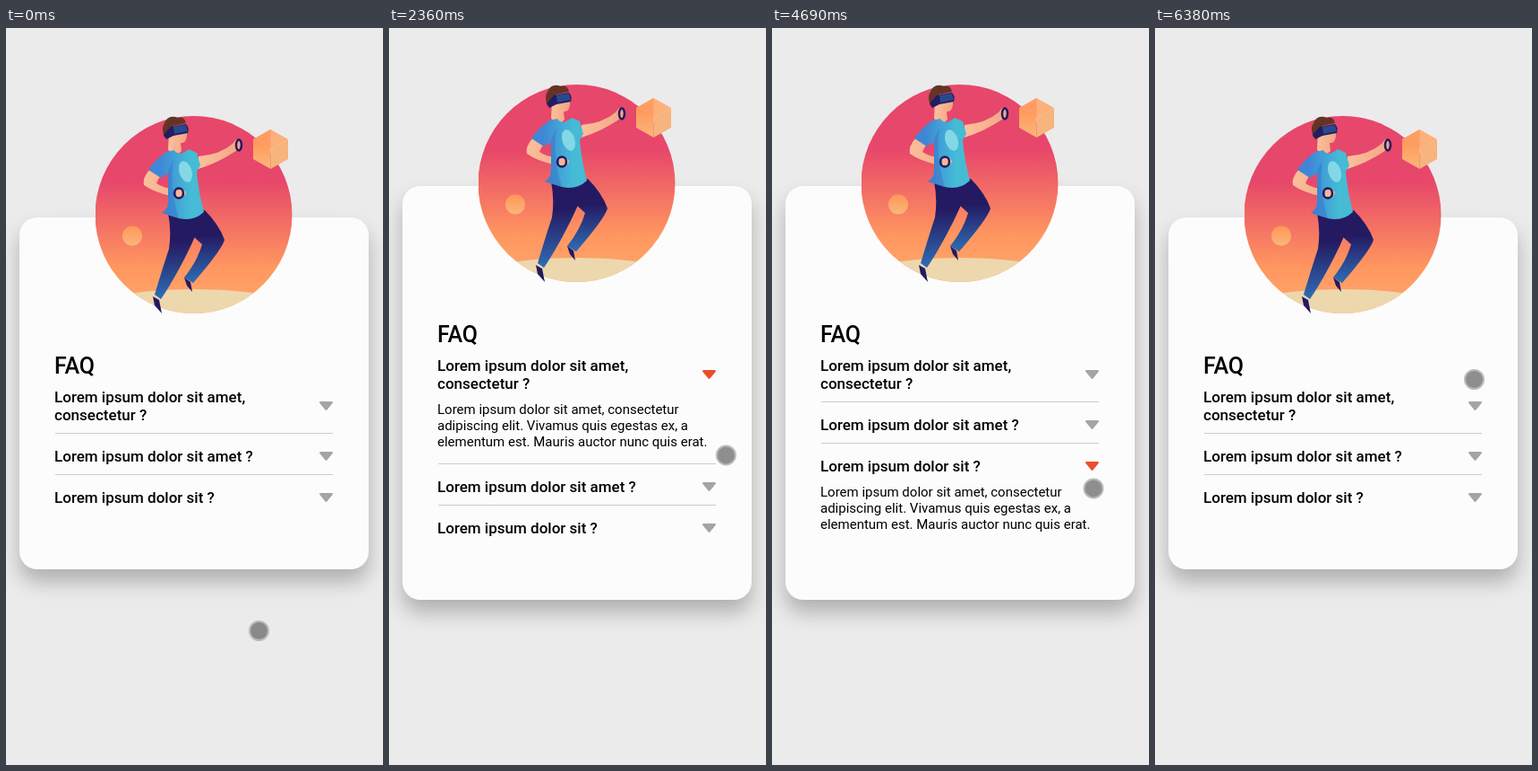
These frames come from a looping animation (421x821 px, 7.18 s). An HTML page:

```html
<!DOCTYPE html>
<html lang="en">
<head>
<meta charset="utf-8">
<title>FAQ accordion</title>
<style>
html, body { margin: 0; width: 100%; height: 100%; overflow: hidden; background: #ebebeb; }
#card { position: absolute; left: 15px; width: 390px; border-radius: 20px; background: #fcfcfc;
  box-shadow: 0 14px 22px rgba(0, 0, 0, .25); }
svg { position: absolute; left: 0; top: 0; }
text { font: 500 17px Roboto, sans-serif; fill: #000; }
.title { font-size: 25px; }
.answer text { font-size: 15px; font-weight: 400; }
</style>
</head>
<body>
<div id="card"></div>
<svg width="421" height="821" viewBox="0 0 421 821">
  <defs>
    <linearGradient id="sky" x2="0" y2="1">
      <stop offset=".33" stop-color="#e7476a"/><stop offset=".76" stop-color="#ff965f"/><stop offset="1" stop-color="#ffa96e"/>
    </linearGradient>
    <linearGradient id="shirt"><stop offset=".2" stop-color="#3f86d6"/><stop offset=".75" stop-color="#45bbd6"/></linearGradient>
    <linearGradient id="pants" x2="0" y2="1"><stop offset=".35" stop-color="#241a62"/><stop offset="1" stop-color="#2f6db5"/></linearGradient>
    <linearGradient id="skin"><stop offset="0" stop-color="#fcc09b"/><stop offset="1" stop-color="#f3a585"/></linearGradient>
    <linearGradient id="peach" x2="0" y2="1"><stop offset="0" stop-color="#ff9757"/><stop offset="1" stop-color="#fbb67c"/></linearGradient>
    <clipPath id="disc"><circle cx="209.5" cy="208" r="110"/></clipPath>
  </defs>

  <g id="head">
    <g clip-path="url(#disc)">
      <rect x="100" y="98" width="220" height="220" fill="url(#sky)"/>
      <ellipse cx="209.5" cy="318" rx="125" ry="27" fill="#edd7ad"/>
    </g>
    <circle cx="141" cy="231.5" r="11" fill="url(#peach)"/>
    <path d="M295.5 113 315 124 295.5 135 276 124Z" fill="#fdb07a"/>
    <path d="M276 124 295.5 135V157L276 146Z" fill="url(#peach)"/>
    <path d="M315 124 295.5 135V157L315 146Z" fill="#f7b47d"/>
    <path d="M276 124 295.5 113 295.5 135Z" fill="#ff9c62"/>

    <path d="M222 203Q238 219 244 236Q241 247 209 284L199 278Q214 259 219 241L200 224Z" fill="url(#pants)"/>
    <path d="M181 206 222 203Q213 232 194 267Q182 289 173 302L166 297Q175 267 182 246Q185 226 181 206Z" fill="url(#pants)"/>
    <path d="M164 299 171 303 174 318 166 309ZM199 278 206 283 208 294 202 287Z" fill="#241a62"/>
    <path d="M215 143Q239 141 253 129L257 124 263 126 261 134Q240 149 215 157Z" fill="url(#skin)"/>
    <ellipse cx="260" cy="130.500" rx="3" ry="6" fill="none" stroke="#241a62" stroke-width="2.500"/>
    <path d="M161 157Q152 167 154 175Q165 183 187 188L199 189 200 181 190 180Q174 178 168 173Q170 168 173 164Z" fill="url(#skin)"/>
    <path d="M182 117 181 135Q186 147 196 137L195 128Q203 129 202 114L187 109Z" fill="url(#skin)"/>
    <path d="M188 136Q193 144 204 135L213 139 217 153 213 160Q215 183 221 205Q209 216 193 212L174 206Q182 202 181 190L181 162 173 167 159 158Q167 146 179 138Z" fill="url(#shirt)"/>
    <path d="M181 159 187 147Q182 178 193 212L174 206Q182 202 181 190Z" fill="#3878cc" opacity=".55"/>
    <ellipse cx="200.500" cy="160" rx="7" ry="12" transform="rotate(-17 200.500 160)" fill="#83d8e6"/>
    <path d="M190 181Q199 178 201 184Q198 190 190 188Z" fill="#fcb694"/>
    <ellipse cx="193" cy="184" rx="5" ry="5.500" fill="none" stroke="#241a62" stroke-width="2.500"/>
    <path d="M177 122Q173 111 177 106Q181 96 192 100Q199 98 201 106L187 109 183 116Z" fill="#643328"/>
    <path d="M176 119 184 110 201 107Q205 111 203 117L187 120 179 124Z" fill="#221c62"/>
    <path d="M187 110 201 108 203 115 188 118Z" fill="#284a8c"/>

    <text class="title" x="54" y="385">FAQ</text>
  </g>

  <g id="list"></g>
  <circle id="cursor" r="10.5" stroke-width="2"/>
</svg>
<script>
const LOOP = 7180;
const GROW = 69;
const LIFT = 35;
const $ = id => document.getElementById(id);
const text = (x, y, s) => `<text x="${x}" y="${y}">${s}</text>`;

const questions = [
  { lines: ["Lorem ipsum dolor sit amet,", "consectetur ?"], y: 437, arrow: -21 },
  { lines: ["Lorem ipsum dolor sit amet ?"], y: 483, arrow: -11 },
  { lines: ["Lorem ipsum dolor sit ?"], y: 529, arrow: -11 }
];
const answer = [
  "Lorem ipsum dolor sit amet, consectetur",
  "adipiscing elit. Vivamus quis egestas ex, a",
  "elementum est. Mauris auctor nunc quis erat."
];

// time, item opened (-1 closes all), age of the tap when it shows
const taps = [[0, -1, 999], [1660, 0, 0], [3110, 1, 110], [4250, 2, 0], [5540, 0, 0], [6240, -1, 0]];
const presses = [[1590, 1660], [4100, 4250], [5460, 5540], [6160, 6240]];

// time, x, y of the pointer
const path = [
  [0, 282.5, 671.5], [500, 282.5, 671.5], [1090, 369.5, 428.5], [1230, 363, 421.5], [1310, 361.5, 419],
  [2030, 361.5, 419], [2310, 378, 466], [2580, 360.5, 511.5],
  [3420, 360.5, 511.5], [3640, 369, 540], [3820, 363, 560], [3890, 360, 560.5],
  [4500, 360, 560.5], [4960, 357, 414], [5180, 356.5, 391.5], [LOOP, 356.5, 391.5]
];

$("list").innerHTML = questions.map((q, i) => `<g>
  ${q.lines.map((s, n) => text(54, 20 * (n + 1 - q.lines.length), s)).join("")}
  <g transform="translate(350 ${q.arrow})">
    <path class="arrow" d="M.8 0h13.400q1.300 .5 .4 2l-6 7.300q-1.100 1.300-2.200 0l-6-7.300q-.9-1.500 .4-2z"/>
    <rect class="glow" width="15" height="10" fill="#33a5d0"/>
  </g>
  <g class="answer">${answer.map((s, n) => text(54, 28 + 18 * n, s)).join("")}</g>
  ${i < 2 ? '<path class="rule" d="M55 14.500H365" stroke="#cbcbcb"/>' : ""}
</g>`).join("");

const rows = [...$("list").children].map(g => ({
  g,
  arrow: g.querySelector(".arrow"),
  glow: g.querySelector(".glow"),
  answer: g.querySelector(".answer"),
  rule: g.querySelector(".rule")
}));

const slope = (k, c) => path[k + 1] ? (path[k + 1][c] - path[k][c]) / (path[k + 1][0] - path[k][0]) : 0;

// monotone tangent: smooth through points, at rest on holds and turns
function tangent(k, c) {
  if (!k) return 0;
  const a = slope(k - 1, c), b = slope(k, c);
  return a * b > 0 ? 2 * a * b / (a + b) : 0;
}

function along(t, c) {
  const k = path.findLastIndex(p => p[0] <= t);
  const [p, q] = [path[k], path[k + 1]];
  const d = q[0] - p[0], u = (t - p[0]) / d, v = 1 - u;
  return p[c] * v * v * (1 + 2 * u) + q[c] * u * u * (3 - 2 * u)
    + d * u * v * (v * tangent(k, c) - u * tangent(k + 1, c));
}

function mix(a, b, p) {
  return `rgb(${a.map((v, n) => Math.round(v + (b[n] - v) * p))})`;
}

function draw(t) {
  const [start, open, lead] = taps.findLast(tap => tap[0] <= t);
  const age = t - start + lead;
  const isOpen = open >= 0;
  const lift = isOpen ? -LIFT : 0;

  $("card").style.top = 211 + lift + "px";
  $("card").style.height = 392 + (isOpen ? GROW : 0) + "px";
  $("head").setAttribute("transform", `translate(0 ${lift})`);

  rows.forEach((r, i) => {
    const active = i === open;
    const y = questions[i].y + lift + (isOpen && i > open ? GROW : 0);
    r.g.setAttribute("transform", `translate(0 ${y})`);
    r.answer.setAttribute("display", active ? "inline" : "none");
    r.arrow.setAttribute("fill", mix([164, 164, 164], [235, 78, 44], active ? Math.min(1, age / 160) : 0));
    r.glow.setAttribute("opacity", active ? Math.max(0, .7 * (1 - age / 200)) : 0);
    if (r.rule) r.rule.setAttribute("transform", `translate(0 ${active ? GROW : 0})`);
  });

  const down = presses.some(([a, b]) => t >= a && t < b);
  const cursor = $("cursor");
  cursor.setAttribute("cx", along(t, 1));
  cursor.setAttribute("cy", along(t, 2));
  cursor.setAttribute("fill", down ? "rgba(176,177,12,.75)" : "rgba(97,95,96,.7)");
  cursor.setAttribute("stroke", down ? "#dcdf62" : "#bababa");
}

const begin = performance.now();
function tick() {
  draw((performance.now() - begin) % LOOP);
  requestAnimationFrame(tick);
}
tick();
</script>
</body>
</html>
```
